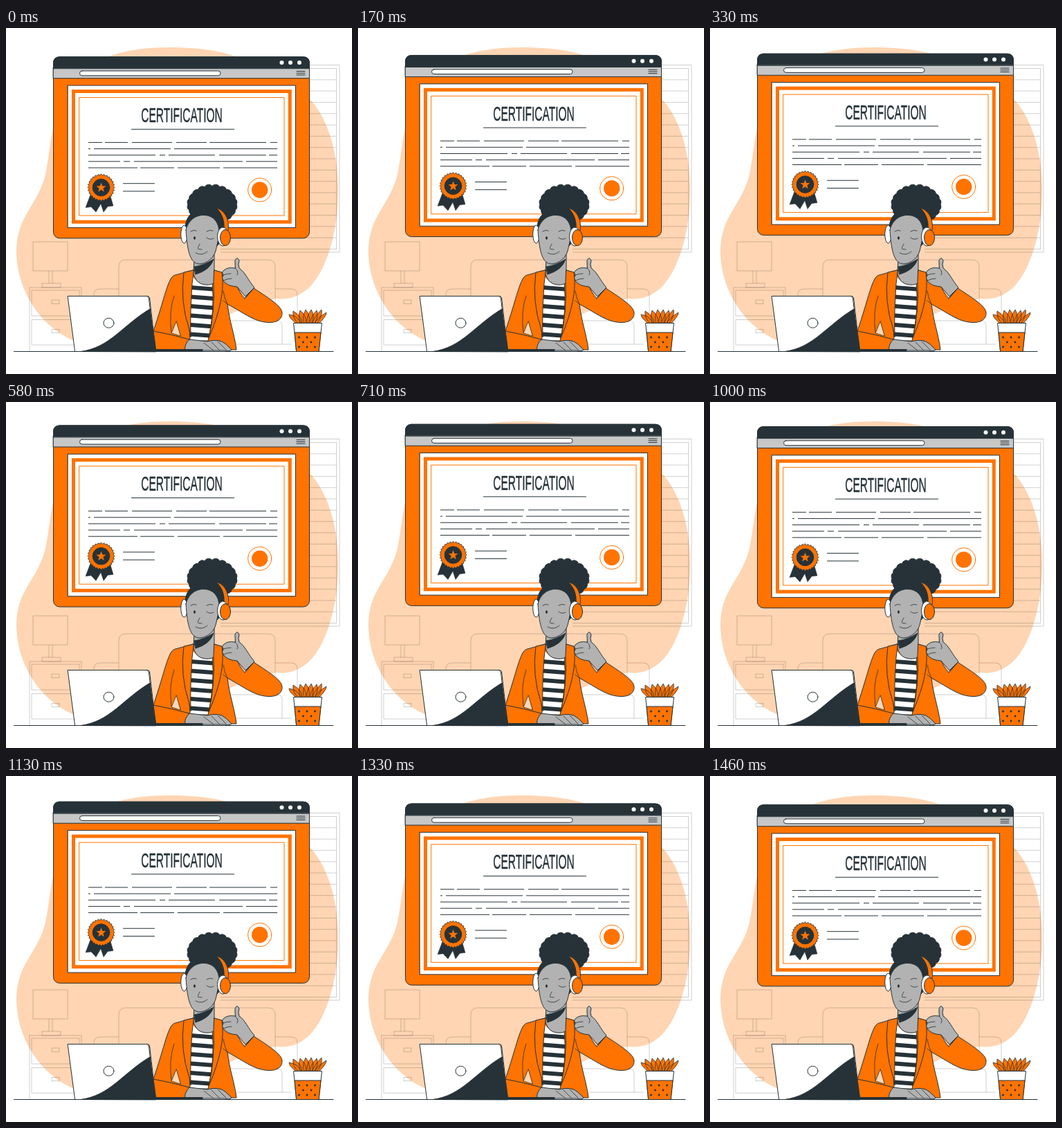
Write an HTML page that moves like this. It is 500 px wide and 500 px high and loops after 1500 ms.

```html
<!DOCTYPE html>
<html lang="en">
<head>
<meta charset="utf-8">
<title>Certification</title>
<style>
  html, body { margin: 0; width: 100%; height: 100%; overflow: hidden; background: #fff; }
  svg { display: block; width: 100%; height: 100%; }
  .ink { stroke: #263238; stroke-linecap: round; stroke-linejoin: round; }
  .none { fill: none; }
  .white { fill: #fff; }
  .dark { fill: #263238; }
  .orange { fill: #ff7300; }
  .peach { fill: #ffd5b3; }
  .skin { fill: #b2b2b2; }
  .fine { stroke-width: .8; }
  .faint { fill: none; stroke: #000; stroke-opacity: .19; }
  .title { font: 15.5px "Liberation Sans", Arial, sans-serif; text-anchor: middle; stroke-width: .25; }
</style>
</head>
<body>
<svg viewBox="0 0 500 500">
  <defs>
    <clipPath id="shirt"><path d="M269 358Q282 377 298 367Q302 410 292 452H266Q262 400 269 358Z"/></clipPath>
  </defs>

  <path class="peach" d="M235 28C285 28 318 34 350 48C385 62 415 83 439 103C465 130 480 180 480 232C481 285 466 346 440 373C424 389 408 393 390 391C320 405 270 448 215 459C165 468 115 462 86 446C45 423 15 375 15 322C16 270 44 260 57 212C64 180 66 115 95 76C125 40 180 28 235 28Z"/>

  <g class="faint">
    <path id="blinds"/>
    <path d="M310 53.5H482V324H310M310 58.5H477.5V319.5H310"/>
    <path d="M39 309H89V351H39ZM62 351V369M67 351V369M52 369H79V375H52Z"/>
    <path d="M34 467V375H109V467M37 379H106V416H37ZM37 421.500H106V458H37ZM66 393H77V398.500H66ZM66 435.500H77V440.500H66Z"/>
    <path d="M163 467V345Q163 335 173 335H379Q389 335 389 345V424M163 377H136Q127 377 127 386V467M389 377H412Q421 377 421 386V467M300 423H392Q399 423 399 430V457M330 457H413"/>
  </g>

  <g id="window" class="ink">
    <rect class="orange" x="68.500" y="41.700" width="370" height="262.100" rx="9"/>
    <path fill="#c7c7c7" d="M68.500 57H438.500V72.700H68.500Z"/>
    <path class="dark" d="M68.500 58.300V50.700Q68.500 41.700 77.500 41.700H429.500Q438.500 41.700 438.500 50.700V58.300Z"/>
    <g class="white" stroke="none"><circle cx="398.500" cy="50" r="3"/><circle cx="411" cy="50" r="3"/><circle cx="424" cy="50" r="3"/></g>
    <rect class="white" x="106.500" y="62" width="203.500" height="6.800" rx="3.400"/>
    <path d="M420 62.500H432M420 65.200H432M420 67.900H432"/>
    <rect class="white" x="89.500" y="83" width="329" height="205.500"/>
    <g class="none" stroke="#ff7300">
      <rect x="97.500" y="91.500" width="312.800" height="188.700" stroke-width="5" stroke-linejoin="miter"/>
      <rect x="106" y="100.500" width="296" height="170.500"/>
      <circle cx="366.700" cy="234" r="17"/>
    </g>
    <circle class="orange" cx="366.700" cy="234" r="11.700" stroke="none"/>
    <text class="title dark" transform="translate(254 136) scale(1 1.92)">CERTIFICATION</text>
    <path d="M181.500 146.300H329.500M169.500 224.700H214.500M169.500 235.900H214.500"/>
    <path id="copy" stroke-linecap="butt"/>
    <path class="dark" d="M122 241L115 259.500L123 258.500L130 266L137 254L141 266L147 258L155 257L150 240Z" stroke-width=".5"/>
    <path id="rosette" class="orange fine"/>
    <circle class="dark" cx="137.500" cy="230.500" r="12.300"/>
    <path id="star" class="orange" stroke="none"/>
  </g>

  <g class="ink">
    <path id="bun" class="dark"/>
    <path class="dark" d="M259 296C257 275 268 261 288 262C308 262 319 276 316 303L302 318Z"/>
    <ellipse class="white" cx="257.500" cy="298" rx="4.800" ry="13"/>

    <path class="orange" d="M243 357.500C234 361 230 388 213 438Q211 464 221 465H333C330 441 323 425 320 399C337 408 350 418 365 423C385 429 400 424 399 411C398 401 376 388 358 376L345 391C334 379 331 362 320 356L301 350L285 367L271 350Z"/>
    <path class="peach fine" d="M246 424L239 441L252 445Z"/>
    <g clip-path="url(#shirt)"><path class="white" stroke="none" d="M255 350H310V455H255Z"/><path id="stripes" stroke-width="6" stroke-linecap="butt" fill="none"/></g>
    <path class="none" d="M269 358Q262 400 266 452H292Q302 410 298 367"/>
    <path class="skin" d="M272 338L301 325V367Q298 372 288 371Q275 370 271 356Z"/>
    <path class="dark" d="M272 345Q287 343 300 334Q295 350 274 356Z"/>
    <path class="orange" d="M271 350L257 353Q251 395 265 436L267 447Q266 410 269 370Z"/>
    <path class="orange" d="M301 350L312 353Q318 390 293 448Q302 410 300 367Z"/>
    <path class="none fine" d="M243 387Q235 410 239 440M320 399Q315 390 314 380M320 399L314 394"/>

    <path class="skin" d="M260 292C263 278 275 268 291 271C304 274 309 286 308 300L304 318C302 332 290 341 279 341C267 340 262 325 260 292Z"/>
    <path class="orange" d="M304 260C318 264 323 279 321 293L315 291C316 279 313 269 304 260Z"/>
    <ellipse class="white" cx="313.500" cy="301.500" rx="8" ry="13.500"/>
    <ellipse class="orange" cx="317" cy="303" rx="7.500" ry="11.500"/>
    <ellipse class="dark" cx="272.500" cy="303.500" rx="1" ry="2"/>
    <path class="none fine" d="M267 294Q271 291 275 293M290 294Q294 291 299 293M290 303Q295 307 300 304M280 312Q276 319 278 319.500L283 320M274 325Q283 330 291 323"/>

    <path class="skin" d="M331 336Q334 329 337 336Q335 342 337 347C346 353 350 365 359 375L346 388L334 374Q319 373 314 365Q311 361 314 357Q311 353 315 350Q321 345 331 347Z"/>
    <path class="none fine" d="M314 357Q319 355 325 355M314 365Q320 362 326 362M331 347Q337 352 334 357"/>
    <path class="none" d="M358 376L345 391"/>
    <path class="orange" d="M213 438Q240 443 265 450L259 465H217Z"/>
    <path class="skin" d="M265 450L291 453Q308 448 318 457L326 465Q323 468 316 466H259Q257 458 265 450Z"/>
    <path class="none fine" d="M286 455L300 466M297 454L309 466M306 453L318 465"/>
  </g>

  <g class="ink">
    <path class="dark" d="M215 464.500H284V467.500H215Z"/>
    <path class="white" d="M89.500 387.500H204Q207 387.500 207.500 390L216.500 467.500H100Z"/>
    <path class="dark" d="M108 467.500C150 462 168 430 208 406L216.500 467.500Z"/>
    <path class="none" d="M204 387.500Q206 388 206.500 391L215 467.500"/>
    <ellipse class="white" cx="148.500" cy="426.300" rx="7.500" ry="7"/>
    <path id="leaves" class="orange fine"/>
    <path class="white" d="M416 426.500H456.500L452 467.500H420Z"/>
    <path class="orange" d="M417.500 440H455L452 467.500H420Z"/>
    <g id="dots" class="dark" stroke="none"></g>
    <path d="M11.500 467.500H473"/>
  </g>
</svg>
<script>
const $ = id => document.getElementById(id);
const draw = (id, d) => $(id).setAttribute('d', d);
const range = (n, f) => Array.from({ length: n }, (_, i) => f(i)).join('');

// Points around a circle, alternating between the full and the inner radius.
const burst = (cx, cy, r, tips, inner) => 'M' + Array.from({ length: tips * 2 }, (_, i) => {
  const a = i * Math.PI / tips - Math.PI / 2, k = i % 2 ? inner : 1;
  return `${cx + r * k * Math.cos(a)} ${cy + r * k * Math.sin(a)}`;
}).join('L') + 'Z';

// A ring of round bumps.
const scallop = (cx, cy, rx, ry, n, r) => range(n + 1, i => {
  const a = i * 2 * Math.PI / n, x = cx + rx * Math.cos(a), y = cy + ry * Math.sin(a);
  return i ? `A${r} ${r} 0 0 1 ${x} ${y}` : `M${x} ${y}`;
}) + 'Z';

draw('blinds', range(15, i => `M310 ${74.8 + i * 16.31}H477.5`));
draw('rosette', burst(137.5, 230.5, 19.5, 28, .91));
draw('star', burst(137.5, 230.8, 7.3, 5, .42));
draw('bun', scallop(298, 255, 35, 26.5, 20, 6.5));
draw('stripes', range(7, i => `M260 ${374.5 + i * 13.5}L305 ${378 + i * 13.5}`));

const lineEnds = [
  [119, 139, 143, 176, 182, 240, 246, 290, 294, 376, 382, 392],
  [119, 122, 127, 238, 243, 392],
  [119, 216, 222, 230, 235, 302, 308, 376, 380, 392],
  [119, 165, 170, 179, 185, 342, 347, 392],
  [119, 190, 194, 243, 248, 309, 314, 392]
];
draw('copy', lineEnds.map((xs, row) =>
  xs.map((x, i) => i % 2 ? `H${x}` : `M${x} ${165.4 + row * 9.15}`).join('')).join(''));

const leafTips = [[409, 414], [463, 411], [415, 409], [456, 407], [425, 408], [449, 408], [441, 407], [433, 407]];
draw('leaves', leafTips.map(([x, y]) => {
  const base = 436 + (x - 436) * .5, mid = (x + base) / 2;
  return `M${base - 3} 427Q${mid - 7} 419 ${x} ${y}Q${mid + 7} 416 ${base + 3} 427Z`;
}).join(''));

$('dots').innerHTML = range(8, i => {
  const row = [0, 0, 0, 1, 1, 2, 2, 2][i], col = i - [0, 3, 5][row];
  return `<circle cx="${423.5 + row % 2 * 6 + col * 11.5}" cy="${447 + row * 7}" r="1.4"/>`;
});

// The window floats up and back at a constant speed, at 24 steps per second.
const LOOP = 1500, STEPS = 36;
function tick() {
  const step = Math.floor((performance.now() + 3.4) % LOOP / LOOP * STEPS);
  const lift = Math.min(step, STEPS - 1 - step) * 20 / STEPS;
  $('window').setAttribute('transform', `translate(0 ${-lift})`);
  requestAnimationFrame(tick);
}
tick();
</script>
</body>
</html>
```
